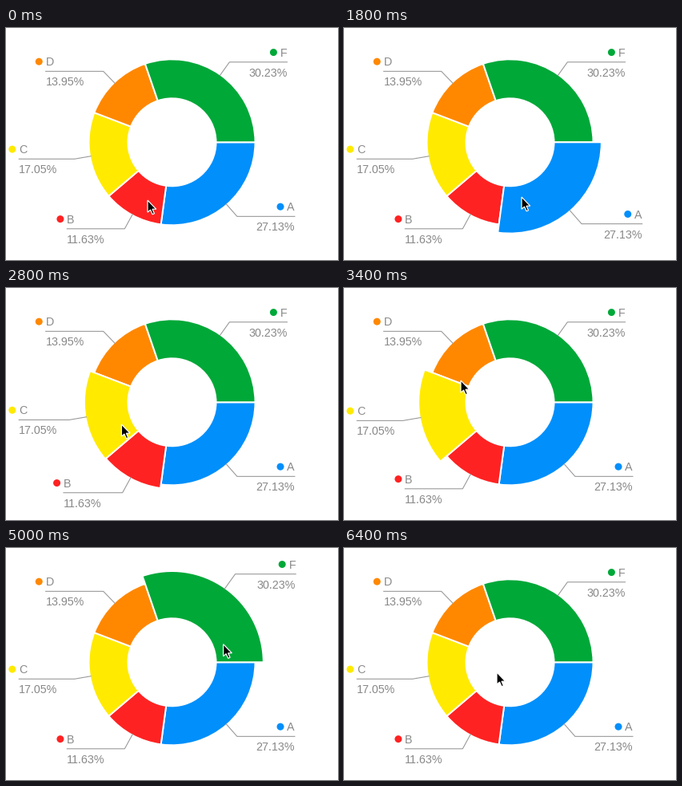
A matplotlib script for the animation above (6600 ms loop, 415 by 291 pixels).

```python
from itertools import pairwise

import numpy as np
import matplotlib.pyplot as plt
from matplotlib.animation import FuncAnimation
from matplotlib.patches import Circle, Polygon, Wedge

W, H, DPI = 415, 291, 64
PX = 72 / DPI                      # one pixel in points
FRAMES, STEP = 33, 200
CENTER = np.array([207.5, 143.3])
INNER, OUTER = 56, 103
GAP = 2                            # white border between slices
FADE = 1.1                         # hover transition, in frames
GREY, LINE = "#888888", "#999999"

SLICES = [
    ("A", 27.13, "#008ffb"),
    ("B", 11.63, "#ff2222"),
    ("C", 17.05, "#ffea00"),
    ("D", 13.95, "#ff8800"),
    ("F", 30.23, "#00a838"),
]

# which slice is hovered from which frame on
HOVERS = [(6.2, "A"), (10.5, "B"), (13.4, "C"), (17, "D"), (19.5, ""),
          (21.3, "F"), (27.6, "A"), (30.3, "")]

# frame, x, y of the pointer tip at its turns
TURNS = [(0, 177, 216), (2, 179, 164), (5, 218, 219), (9, 222, 212),
         (12, 167, 203), (15, 133, 155), (17, 146, 116), (21, 222, 91),
         (26, 284, 128), (28, 262, 196), (32, 191, 156)]
ARROW = 0.95 * np.array([(0, 0), (0, 16), (3.7, 12.7), (6.4, 18.7),
                         (8.9, 17.6), (6.3, 11.8), (11.3, 11.8)])


def fade_in(frame, start):
    return np.clip((frame - start) / FADE, 0, 1)


def hover_level(frame, name):
    """Strength 0..1 of the hover effect on one slice."""
    return sum(fade_in(frame, enter) - fade_in(frame, leave)
               for (enter, hovered), (leave, _) in pairwise(HOVERS)
               if hovered == name)


def pointer_tip(frame):
    times, *coords = zip(*TURNS)
    return np.array([np.interp(frame, times, c) for c in coords])


class Slice:
    def __init__(self, ax, name, percent, color, start, end):
        mid = np.radians((start + end) / 2)
        self.dir = np.array([np.cos(mid), np.sin(mid)])
        self.side = 1 if self.dir[0] > 0 else -1
        self.wedge = ax.add_patch(Wedge(
            CENTER, OUTER, start, end, width=OUTER - INNER,
            fc=color, ec="white", lw=GAP * PX, joinstyle="miter"))
        self.line, = ax.plot([], [], color=LINE, lw=1.1 * PX, zorder=3)
        self.dot = ax.add_patch(Circle((0, 0), 4.5, fc=color, lw=0))
        style = dict(color=GREY, fontsize=14.2 * PX, family="Liberation Sans",
                     ha="right" if self.side > 0 else "left", va="baseline")
        self.name = ax.text(0, 0, name, **style)
        self.value = ax.text(0, 0, f"{percent:.2f}%", **style)
        self.dot_gap = 8.4
        if self.side > 0:
            self.dot_gap += self.name.get_window_extent().width

    def update(self, frame):
        level = hover_level(frame, self.name.get_text())
        radius = OUTER * (1 + 0.1 * level)
        self.wedge.set_radius(radius + GAP / 2)
        self.wedge.set_width(radius - INNER + GAP)
        self.wedge.set_zorder(1 + level)

        root = CENTER + self.dir * radius
        x, y = CENTER + self.dir * radius * 1.2
        end = max(x + self.side * (36 + 0.35 * radius), 16.2)
        self.line.set_data([root[0], x, end], [root[1], y, y])
        self.dot.center = (end - self.dot_gap, y - 12.2)
        self.name.set_position((end, y - 7))
        self.value.set_position((end, y + 18))


fig = plt.figure(figsize=(W / DPI, H / DPI), dpi=DPI, facecolor="white")
ax = fig.add_axes([0, 0, 1, 1])
ax.set_xlim(0, W)
ax.set_ylim(H, 0)
ax.axis("off")

slices = []
angle = 0
for name, percent, color in SLICES:
    end = angle + 3.6 * percent
    slices.append(Slice(ax, name, percent, color, angle, end))
    angle = end

pointer = ax.add_patch(Polygon(ARROW, fc="black", ec="white", lw=1.2 * PX, zorder=5))


def update(frame):
    for part in slices:
        part.update(frame)
    pointer.set_xy(ARROW + pointer_tip(frame))
    return []


anim = FuncAnimation(fig, update, frames=FRAMES, interval=STEP,
                     init_func=lambda: update(0), repeat=True, repeat_delay=0)
plt.show()
```
